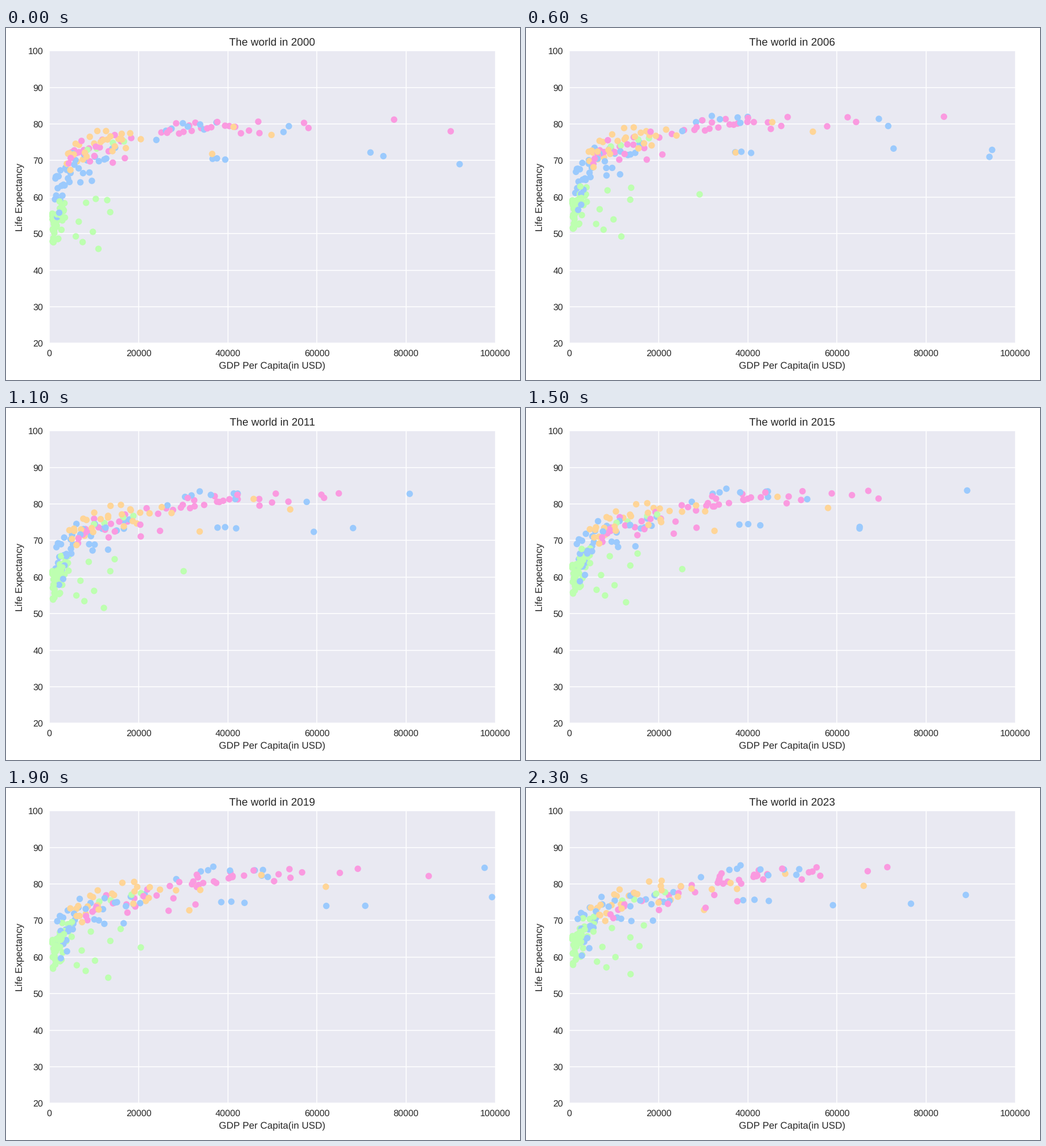
Write a matplotlib script that moves like this. It is 903 px wide and 620 px high and loops after 2400 ms.

```python
import numpy as np
import matplotlib.pyplot as plt
from matplotlib.animation import FuncAnimation

W, H, DPI = 903, 620, 128
PX = 72 / DPI
FIRST, YEARS = 2000, 24
BLUE, PINK, ORANGE, GREEN = "#9bcafd", "#fa9ae0", "#ffd597", "#bdffb0"
INK, PANEL = "#262626", "#e9e9f2"

plt.rcParams.update({"font.family": "Liberation Sans", "text.hinting": "none",
                     "text.hinting_factor": 1})
rng = np.random.default_rng(5)
span = np.arange(YEARS) / (YEARS - 1)
rise = span + 0.5 * span * (1 - span)   # gains slow down towards the end
groups = []


def crowd(color, n, income, growth, start, end, spread):
    """n countries around a curve a + b*log(income) that moves from start to end."""
    low, high = income
    q = (np.arange(n) + rng.uniform(0.1, 0.9, n)) / n
    x = (low * (high / low) ** q)[:, None] * rng.uniform(*growth, n)[:, None] ** span
    (a0, b0), (a1, b1) = start, end
    y0, y1 = a0 + b0 * np.log(x), a1 + b1 * np.log(x)
    off = np.clip(rng.normal(0, spread, n), -2 * spread, 2 * spread)[:, None]
    groups.append((color, x, y0 + (y1 - y0) * rise + off))


def loner(color, life, *income):
    """One standout country: life at both ends, income at four key years."""
    x = np.interp(np.arange(YEARS), [0, 6, 11, YEARS - 1], income)
    y = life[0] + (life[1] - life[0]) * rise
    groups.append((color, x[None], y[None]))


# Poorer and middle-income countries
crowd(ORANGE, 22, (3.7, 18), (1.1, 1.8), (69.2, 1.8), (70.3, 2), 2.3)
crowd(ORANGE, 6, (12, 21), (1.4, 2), (77, 0), (79.8, 0), 1.1)
crowd(PINK, 22, (4.2, 19), (1.85, 2.6), (67.6, 1.9), (62, 4.3), 2.2)
crowd(BLUE, 36, (1.2, 15.5), (1.2, 2.1), (59, 5), (63.2, 4.3), 3.6)
crowd(GREEN, 44, (0.6, 3.6), (0.95, 1.7), (52.7, 2.5), (63, 3.2), 2.9)
crowd(GREEN, 8, (5.4, 15), (1, 1.35), (52, 0), (61.5, 0), 4)
crowd(GREEN, 4, (8, 20), (1.2, 1.4), (73.5, 0), (76, 0), 1.2)

# Rich countries
crowd(PINK, 19, (25, 47), (1.05, 1.3), (73, 1.6), (66.6, 4.1), 1)
crowd(BLUE, 8, (23.4, 39), (1.15, 1.7), (58, 6), (83.3, 0), 0.9)
crowd(BLUE, 3, (35, 41), (0.95, 1.25), (70.4, 0), (75.5, 0), 0.8)

# Standouts
loner(BLUE, (69, 74.6), 92, 94.2, 59.3, 76.6)
loner(BLUE, (72.2, 74.2), 72, 94.8, 68.1, 59.1)
loner(BLUE, (71.2, 77), 74.9, 72.7, 120, 88.9)
loner(BLUE, (79.4, 85), 53.7, 69.4, 80.8, 106)
loner(BLUE, (77.8, 82.4), 52.5, 71.5, 57.7, 44.6)
loner(PINK, (78, 82.5), 90, 105.4, 108, 115)
loner(PINK, (81.2, 83.4), 77.3, 84, 61, 54.5)
loner(PINK, (77.5, 82.7), 47.1, 57.8, 53.6, 100.8)
loner(PINK, (80.3, 84.6), 57.1, 62.4, 64.9, 71.3)
loner(PINK, (78.9, 83.5), 58.1, 64.3, 61.6, 66.9)
loner(ORANGE, (77, 79.5), 49.8, 54.6, 54, 66)
loner(ORANGE, (79.2, 82.8), 41.3, 45.5, 45.8, 48.4)
loner(ORANGE, (71.8, 72.9), 36.5, 37.3, 33.7, 30.2)
loner(GREEN, (59.5, 63), 10.4, 29.2, 30.1, 15.7)

gdp = np.vstack([x for _, x, _ in groups]) * 1000
life = np.vstack([y for *_, y in groups])
tint = np.concatenate([[c] * len(x) for c, x, _ in groups])
order = rng.permutation(len(tint))      # colours overlap in no fixed order
gdp, life, tint = gdp[order], life[order], tint[order]

fig = plt.figure(figsize=(W / DPI, H / DPI), dpi=DPI, facecolor="white")
left, right, top, bottom = 76.3, 859.6, 40.3, 555.3
ax = fig.add_axes([left / W, 1 - bottom / H, (right - left) / W, (bottom - top) / H],
                  facecolor=PANEL)
ax.set(xlim=(0, 100000), ylim=(20, 100),
       xticks=range(0, 100001, 20000), yticks=range(20, 101, 10))
ax.set_axisbelow(True)
ax.grid(color="white", lw=1.57 * PX)
ax.spines[:].set_visible(False)
ax.tick_params(length=0, pad=11 * PX, labelsize=15.7 * PX, labelcolor=INK)
label = dict(fontsize=17.2 * PX, color=INK, labelpad=6.3 * PX)
ax.set_xlabel("GDP Per Capita(in USD)", **label)
ax.set_ylabel("Life Expectancy", **label)
title = ax.set_title("", fontsize=18.8 * PX, color=INK, pad=9.4 * PX)
dots = ax.scatter(gdp[:, 0], life[:, 0], s=(11.4 * PX) ** 2, c=tint, lw=0)


def draw(i):
    dots.set_offsets(np.column_stack([gdp[:, i], life[:, i]]))
    title.set_text(f"The world in {FIRST + i}")
    return dots, title


anim = FuncAnimation(fig, draw, frames=YEARS, interval=100, repeat=True, repeat_delay=0)
plt.show()
```
